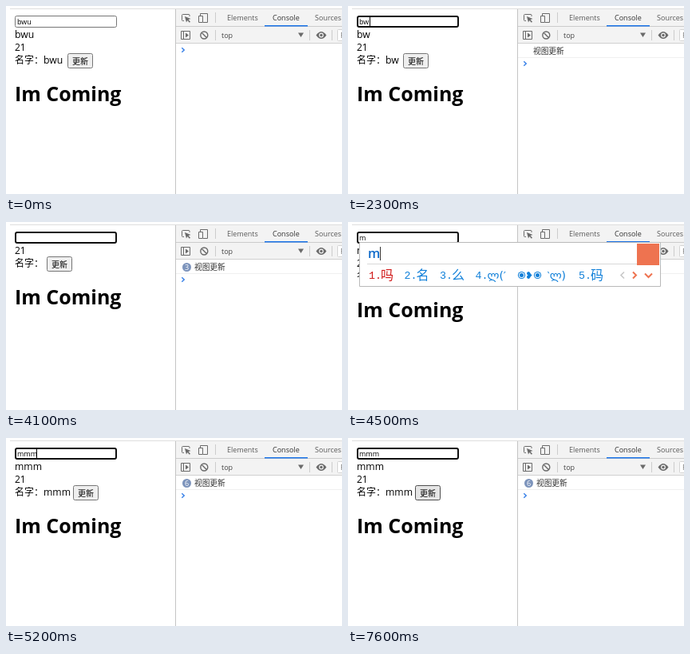
These frames come from a looping animation (421 px wide and 235 px high, 8 s). An HTML page with a canvas:

```html
<!DOCTYPE html>
<html lang="zh-CN">
<head>
<meta charset="utf-8">
<title>Two-way binding demo</title>
<style>
html, body { margin: 0; width: 100%; height: 100%; overflow: hidden; background: #fff; }
canvas { display: block; width: 421px; height: 235px; }
</style>
</head>
<body>
<canvas id="stage"></canvas>
<script>
const W = 421, H = 235, LOOP = 8000;
const canvas = document.getElementById('stage');
const ctx = canvas.getContext('2d');
const dpr = window.devicePixelRatio || 1;
canvas.width = W * dpr;
canvas.height = H * dpr;

const SANS = '"Open Sans", "Noto Sans CJK SC", "Noto Sans CJK", sans-serif';
const CJK = '"Noto Sans CJK SC", "Noto Sans CJK", sans-serif';
const MONO = '"Liberation Mono", monospace';
const SYMBOL = '"DejaVu Sans", sans-serif';
const BLUE = '#0f7fd9', CORAL = '#ee7350', ICON = '#6a6a6a';

// Each step changes some fields at the given time.
const steps = [
  [0, { text: 'bwu', caret: 0, caretX: 33, buttonX: 77, logs: 0, ime: null,
        focus: false, hoverInput: false, hoverButton: false }],
  [900, { hoverInput: true }],
  [1200, { focus: true, caret: 1 }],
  [1700, { caret: 0 }],
  [2200, { caret: 1 }],
  [2300, { text: 'bw', caretX: 27, buttonX: 69, logs: 1 }],
  [2600, { text: 'b', caretX: 19, buttonX: 58, logs: 2 }],
  [2700, { text: '', caretX: 14, buttonX: 51 }],
  [2800, { logs: 3 }],
  [3200, { caret: 0 }],
  [3700, { caret: 1 }],
  [4100, { caret: 0 }],
  [4500, { text: 'm', caretX: 22, buttonX: 62, logs: 4,
           ime: { typed: 'm', words: ['吗', '名', '么', '', '码'], width: 378 } }],
  [4700, { text: 'mm', caretX: 30, buttonX: 73, logs: 5,
           ime: { typed: "m'm", words: ['妈妈', '明明', '慢慢', '妹妹', '美美'], width: 378 } }],
  [5000, { text: 'mmm', caretX: 38, buttonX: 84, logs: 6,
           ime: { typed: "m'm'm", words: ['妈妈妈', '喵喵喵', '慢慢慢', '摸摸摸', '么么么'], width: 460 } }],
  [5200, { ime: null, caret: 1 }],
  [5700, { caret: 0 }],
  [6100, { caret: 1 }],
  [6700, { caret: 0 }],
  [7200, { caret: 1 }],
  [7300, { hoverButton: true }],
  [7600, { caret: 0 }]
];

function stateAt(t) {
  const s = {};
  for (const [start, change] of steps) if (start <= t) Object.assign(s, change);
  return s;
}

function rect(x, y, w, h, color) {
  ctx.fillStyle = color;
  ctx.fillRect(x, y, w, h);
}

function text(str, x, y, size, color = '#000', family = SANS, weight = 400) {
  ctx.font = `${weight} ${size}px ${family}`;
  ctx.fillStyle = color;
  ctx.fillText(str, x, y);
}

function box(x, y, w, h, fill, stroke, line = 1, radius = 2) {
  ctx.beginPath();
  ctx.roundRect(x + line / 2, y + line / 2, w - line, h - line, radius);
  ctx.fillStyle = fill;
  ctx.fill();
  ctx.strokeStyle = stroke;
  ctx.lineWidth = line;
  ctx.stroke();
}

function path(d, color, line = 1, fill = false) {
  const p = new Path2D(d);
  ctx.lineWidth = line;
  ctx.strokeStyle = ctx.fillStyle = color;
  if (fill) ctx.fill(p); else ctx.stroke(p);
}

function circle(x, y, r, color) {
  ctx.beginPath();
  ctx.arc(x, y, r, 0, Math.PI * 2);
  ctx.fillStyle = color;
  ctx.fill();
}

function drawPage(s) {
  if (s.focus) box(11, 12, 128, 15, '#fff', '#101010', 2);
  else box(11, 12, 128, 15, '#fff', s.hoverInput ? '#3c3c3c' : '#767676');
  text(s.text, 14, 23, 9);
  if (s.caret) rect(s.caretX, 14, 1, 11, '#000');

  const dy = s.text ? 0 : -16;
  text(s.text, 11, 40, 12.2);
  text('21', 11, 56 + dy, 12);
  text('名字：', 11, 72 + dy, 12);
  text(s.text, 47, 72 + dy, 12.2);
  box(s.buttonX, 59 + dy, 32, 19, s.hoverButton ? '#e5e5e5' : '#efefef',
      s.hoverButton ? '#4f4f4f' : '#767676');
  text('更新', s.buttonX + 6, 73 + dy, 10);
  text('Im Coming', 11, 119 + dy, 25, '#000', SANS, 700);
}

function drawToolbars() {
  rect(5, 3, W - 5, 1, '#dedede');
  rect(212, 4, W - 212, 43, '#f3f3f3');
  rect(212, 25, W - 212, 1, '#cccccc');
  rect(212, 46, W - 212, 1, '#d0d0d0');
  rect(212, 4, 1, H - 4, '#c4c4c4');

  // Inspect and device icons
  path('M223 18.5H221.5Q220.5 18.5 220.5 17.5V11.5Q220.5 10.5 221.5 10.5H229Q230 10.5 230 11.5V13', ICON);
  path('M224 13L231.5 16L228.5 17L231 19.8L229.8 20.8L227.4 18L226 20.5Z', ICON, 1, true);
  path('M243.5 12V9.5H252.5V20.5H247M241.5 12.5H246.5V20.5H241.5Z', ICON);
  rect(262, 8, 1, 13, '#cccccc');

  text('Elements', 277, 18, 9, '#5a5a5a');
  text('Console', 334, 18, 9, '#333333');
  text('Sources', 387, 18, 9, '#5a5a5a');
  rect(324, 24, 54, 1.5, '#1a73e8');

  // Sidebar toggle and clear icons
  path('M219.5 31.5H230.5V41.5H219.5ZM222.5 31.5V41.5', ICON);
  path('M225 33.5L229 36.5L225 39.5Z', ICON, 1, true);
  path('M252.8 36.5A4.5 4.5 0 1 1 243.8 36.5A4.5 4.5 0 1 1 252.8 36.5M245.2 33.3L251.5 39.7', ICON, 1.4);
  rect(262, 30, 1, 13, '#cccccc');

  text('top', 270, 40, 9, '#444444');
  path('M366 33.5H373L369.5 39Z', ICON, 1, true);
  rect(380, 30, 1, 13, '#cccccc');
  path('M388.5 36.5Q395 27.5 401.5 36.5Q395 45.5 388.5 36.5Z', ICON, 1, true);
  circle(395, 36.5, 2.9, '#f3f3f3');
  circle(395, 36.5, 1.7, ICON);
  rect(408, 30, 1, 13, '#cccccc');
  box(415, 29, 30, 15, '#fff', '#d4d4d4', 1, 1);
  text('F', 419, 40, 9, '#777777');
}

function drawConsole(logs) {
  let y = 55;
  if (logs) {
    const counted = logs > 1;
    if (counted) {
      circle(226.5, 56.5, 5.5, '#7d94bc');
      ctx.textAlign = 'center';
      text(logs, 226.5, 59.7, 9, '#fff');
      ctx.textAlign = 'left';
    }
    text('视图更新', counted ? 236 : 232, 60, 9.7, '#303030');
    rect(213, 64, W - 213, 1, '#f0f0f0');
    y = 72;
  }
  path(`M220.3 ${y - 2.8}L223.2 ${y}L220.3 ${y + 2.8}`, '#3a82e8', 1.5);
}

function drawFace(x) {
  text('ლ(′', x, 72, 14, BLUE, SYMBOL);
  for (const cx of [43, 63]) {
    circle(x + cx, 66.5, 4.6, BLUE);
    circle(x + cx, 66.5, 3.5, '#fff');
    circle(x + cx, 66.5, 2.5, BLUE);
  }
  text('❥', x + 47.5, 71, 12, BLUE, SYMBOL);
  text('‵ლ)', x + 75, 72, 14, BLUE, SYMBOL);
}

function drawIme({ typed, words, width }) {
  const right = 14 + width;
  box(14, 25, width, 56, '#fff', '#b9b9b9', 1, 0);
  rect(24, 52, width - 32, 1, '#d9d9d9');
  text(typed, 25, 45, 16, '#0d69c9', SANS, 600);
  rect(Math.round(26 + ctx.measureText(typed).width) - 1, 31, 1, 17, '#333');

  let x = 26;
  words.forEach((word, i) => {
    const color = i ? BLUE : '#d01818';
    text(`${i + 1}.`, x, 71, 13.3, color, MONO);
    if (word) text(word, x + 15, 72, 16, color, CJK, 300);
    else drawFace(x + 15);
    x += (word ? 16 * word.length : 101) + 28.5;
  });

  const a = right - 49;
  path(`M${a + 3} 62.5L${a - 1} 66.5L${a + 3} 70.5`, '#c8c8c8', 1.6);
  path(`M${a + 14} 62.5L${a + 18} 66.5L${a + 14} 70.5`, CORAL, 2);
  path(`M${a + 29} 64.5L${a + 33.5} 69L${a + 38} 64.5`, CORAL, 2);
  rect(right - 30, 27, 28, 27, CORAL);
}

function draw(t) {
  const s = stateAt(t);
  ctx.setTransform(dpr, 0, 0, dpr, 0, 0);
  rect(0, 0, W, H, '#fff');
  drawPage(s);
  drawToolbars();
  drawConsole(s.logs);
  if (s.ime) drawIme(s.ime);
}

const begin = performance.now();
function tick() {
  draw((performance.now() - begin) % LOOP);
  requestAnimationFrame(tick);
}
tick();
</script>
</body>
</html>
```
